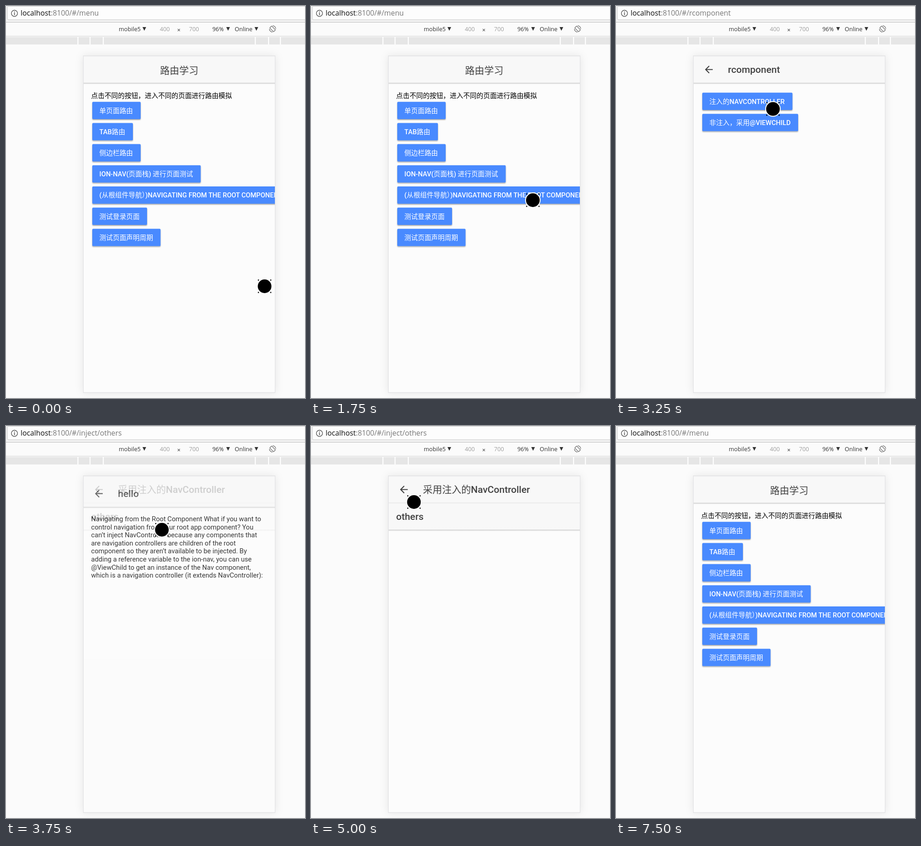
An HTML page that plays this animation: 655 px wide and 856 px high, repeating every 8.75 s.

```html
<!DOCTYPE html>
<html lang="zh">
<head>
<meta charset="utf-8">
<title>路由学习</title>
<style>
  html, body { margin: 0; width: 100%; height: 100%; overflow: hidden; background: #fbfbfb; }
  svg { display: block; width: 655px; height: 856px; }
  text { white-space: pre; }
  .ui { font-family: "Open Sans", "Noto Sans", sans-serif; }
  .app { font-family: Roboto, "Noto Sans CJK SC", "Noto Sans CJK", sans-serif; }
  .url { font-size: 15.8px; fill: #777; }
  .bar { font-size: 12.7px; fill: #333; }
  .dim { fill: #a0a0a0; }
  .title { font-size: 21px; fill: #424242; }
  .label { font-size: 14.7px; fill: #fff; }
  .copy { font-size: 14.7px; fill: #000; }
  .button { fill: #488aff; filter: url(#lift); }
</style>
</head>
<body>
<svg viewBox="0 0 655 856">
  <defs>
    <clipPath id="screen"><rect x="170" y="109.5" width="419.5" height="734.5"/></clipPath>
    <linearGradient id="edge" x2="0" y2="1">
      <stop stop-opacity=".2"/><stop offset="1" stop-opacity="0"/>
    </linearGradient>
    <filter id="lift" x="-5%" y="-20%" width="110%" height="150%">
      <feDropShadow dx="0" dy="1.6" stdDeviation="1" flood-opacity=".4"/>
    </filter>
    <filter id="glow" x="-10%" y="-10%" width="120%" height="120%">
      <feDropShadow dx="0" dy="0" stdDeviation="9" flood-opacity=".09"/>
    </filter>
  </defs>
  <rect width="655" height="856" fill="#fbfbfb"/>
  <g id="browser" class="ui"></g>
  <rect x="169.5" y="109" width="420" height="735" fill="#fcfcfc" stroke="#dfdfe2" filter="url(#glow)"/>
  <g id="pages" class="app" clip-path="url(#screen)"></g>
  <rect x="169.5" y="109" width="420" height="735" fill="none" stroke="#dfdfe2"/>
  <g id="cursor"></g>
</svg>
<script>
const LOOP = 8750, STEP = 250;
const TOP = 109.5, BAR = 58.8;
const $ = id => document.getElementById(id);

function add(parent, tag, attrs = {}, content = '') {
  const el = document.createElementNS('http://www.w3.org/2000/svg', tag);
  for (const key in attrs) el.setAttribute(key, attrs[key]);
  el.textContent = content;
  parent.appendChild(el);
  return el;
}

const rect = (g, x, y, width, height, fill) => add(g, 'rect', { x, y, width, height, fill });

// Latin runs may be heavier than the Chinese ones beside them.
function text(g, x, y, cls, str, weight = 400, anchor = 'start') {
  const el = add(g, 'text', { x, y, class: cls, 'text-anchor': anchor });
  for (const run of str.match(/[\u2e80-\uffef]+|[^\u2e80-\uffef]+/g)) {
    add(el, 'tspan', { 'font-weight': run[0] < '\u2e80' ? weight : 400 }, run);
  }
  return el;
}

function buildBrowser() {
  const g = $('browser');
  rect(g, 0, 0, 655, 36, '#f3f3f3');
  add(g, 'rect', { x: 3, y: .5, width: 670, height: 29.5, rx: 2, fill: '#fdfdfd', stroke: '#c4c4c4' });
  rect(g, 0, 35, 655, 1, '#b9b9b9');
  add(g, 'circle', { cx: 18.5, cy: 16, r: 6.7, fill: 'none', stroke: '#555', 'stroke-width': 1.4 });
  rect(g, 17.7, 14.8, 1.7, 5, '#555');
  rect(g, 17.7, 12, 1.7, 1.7, '#555');

  const url = add(g, 'text', { x: 32, y: 21, class: 'url' });
  add(url, 'tspan', { fill: '#111' }, 'localhost');
  add(url, 'tspan', {}, ':8100/#/');
  const path = add(url, 'tspan');

  const bar = [[247, 'mobile5'], [337, '400', 'dim'], [375, '×'], [401, '700', 'dim'], [452, '96%'], [501, 'Online']];
  for (const [x, str, cls = ''] of bar) text(g, x, str === '×' ? 57 : 55, 'bar ' + cls, str);
  for (const x of [299, 482.5, 544.5]) {
    add(g, 'path', { d: `M${x} 46h8l-4 8z`, fill: '#333' });
  }
  const turn = add(g, 'g', { transform: 'translate(584 50)', fill: 'none', stroke: '#555', 'stroke-width': 1.1 });
  add(turn, 'rect', { x: -3, y: -6, width: 6, height: 12, rx: .8, transform: 'rotate(-45)' });
  add(turn, 'path', { d: 'M0-7A7 7 0 0 1 7 0M0 7A7 7 0 0 1-7 0' });

  rect(g, 0, 65.5, 655, 1, '#cfcfcf');
  rect(g, 0, 68, 655, 16, '#e6e6e6');
  for (const x of [156.5, 183, 212, 545, 574, 600]) rect(g, x, 68, 2.2, 16, '#fff');
  return path;
}

function toolbar(g, y) {
  rect(g, 169, y, 421, BAR, '#f8f8f8');
  rect(g, 169, y + BAR - .6, 421, 3.4, 'url(#edge)');
}

function page(title, back = true) {
  const g = add($('pages'), 'g');
  rect(g, 169, TOP, 421, 760, '#fcfcfc');
  toolbar(g, TOP);
  if (back) {
    add(g, 'path', {
      d: 'M20 11H7.83l5.59-5.59L12 4l-8 8 8 8 1.41-1.41L7.83 13H20z',
      transform: 'translate(190.7 126) scale(1.06)', fill: '#424242'
    });
    text(g, 245.3, 146.4, 'title', title, 500);
  } else {
    text(g, 379.5, 147.8, 'title', title, 500, 'middle');
  }
  return g;
}

function buttons(g, y, items) {
  items.forEach(([str, width], i) => {
    const top = y + i * 46.2;
    add(g, 'rect', { x: 189, y: top, width, height: 37.8, rx: 2, class: 'button' });
    text(g, 204.6, top + 24.4, 'label', str, 500);
  });
}

function buildPages() {
  const menu = page('路由学习', false);
  text(menu, 186.5, 200.5, 'copy', '点击不同的按钮，进入不同的页面进行路由模拟');
  buttons(menu, 209.2, [
    ['单页面路由', 106], ['TAB路由', 89], ['侧边栏路由', 106],
    ['ION-NAV(页面栈) 进行页面测试', 237.5],
    ['(从根组件导航）)NAVIGATING FROM THE ROOT COMPONENT', 450],
    ['测试登录页面', 120], ['测试页面声明周期', 149.5]
  ]);

  const rcomponent = page('rcomponent');
  buttons(rcomponent, 189.2, [['注入的NAVCONTROLLER', 197.5], ['非注入，采用@VIEWCHILD', 210]]);

  const others = page('采用注入的NavController');
  toolbar(others, TOP + BAR);
  text(others, 186.5, 205.2, 'title', 'others', 500);

  const hello = page('hello');
  [
    'Navigating from the Root Component What if you want to',
    'control navigation from your root app component? You',
    'can’t inject NavController because any components that',
    'are navigation controllers are children of the root',
    'component so they aren’t available to be injected. By',
    'adding a reference variable to the ion-nav, you can use',
    '@ViewChild to get an instance of the Nav component,',
    'which is a navigation controller (it extends NavController):'
  ].forEach((line, i) => text(hello, 186.5, 199 + i * 17.64, 'copy', line));

  return { menu, rcomponent, others, hello };
}

function buildCursor() {
  const g = $('cursor');
  add(g, 'circle', { r: 17, fill: '#fff' });
  add(g, 'circle', { r: 15 });
  for (const x of [-13.5, 13.5]) {
    for (const y of [-13.5, 13.5]) rect(g, x - 1.2, y - 1.2, 2.4, 2.4, '#000');
  }
}

// Pointer waypoints: time, x, y.
const track = [
  [0, 566.5, 612], [250, 558, 596], [750, 515, 510], [1250, 497.5, 441],
  [1500, 490, 428], [1750, 486, 424], [2000, 458, 445], [2250, 413.5, 468.5],
  [2500, 385, 300], [3000, 345, 224], [3750, 341.5, 226.5], [4000, 300, 205],
  [4500, 214, 147], [4750, 214, 147], [5000, 225.5, 166], [5250, 225.5, 166],
  [5500, 214, 149], [5750, 214, 150], [6000, 224, 176], [6250, 224, 176],
  [6500, 233.5, 190.5], [6750, 214, 152], [7000, 209, 146], [7500, 209, 146]
];

// Base page and address from each time on.
const routes = [
  [0, 'menu', 'menu'], [2000, 'rcomponent', 'rcomponent'], [3500, 'others', 'inject/others'],
  [5750, 'rcomponent', 'rcomponent'], [7250, 'menu', 'menu']
];

function pointerAt(t) {
  const i = Math.max(1, track.findIndex(p => p[0] >= t));
  const [t0, x0, y0] = track[i - 1], [t1, x1, y1] = track[i];
  const k = (t - t0) / (t1 - t0);
  return [x0 + (x1 - x0) * k, y0 + (y1 - y0) * k];
}

const path = buildBrowser(), pages = buildPages();
buildCursor();
const show = (el, on) => el.setAttribute('visibility', on ? 'visible' : 'hidden');

function draw(time) {
  const t = Math.floor((time % LOOP) / STEP) * STEP;
  const [, name, address] = routes.filter(r => r[0] <= t).pop();
  path.textContent = address;
  for (const key in pages) show(pages[key], key === name);

  // The pushed page rises and fades in over the one below it.
  const u = Math.min(1, (t - 3640) / 280);
  if (u > 0 && t < 4750) {
    const ease = 1 - (1 - u) ** 3;
    show(pages.hello, true);
    pages.hello.setAttribute('opacity', ease);
    pages.hello.setAttribute('transform', `translate(0 ${(1 - ease) * 40})`);
  }

  const visible = t < 7500;
  show($('cursor'), visible);
  if (visible) $('cursor').setAttribute('transform', `translate(${pointerAt(t)})`);
}

const start = performance.now();
function tick() {
  draw(performance.now() - start);
  requestAnimationFrame(tick);
}
tick();
</script>
</body>
</html>
```
